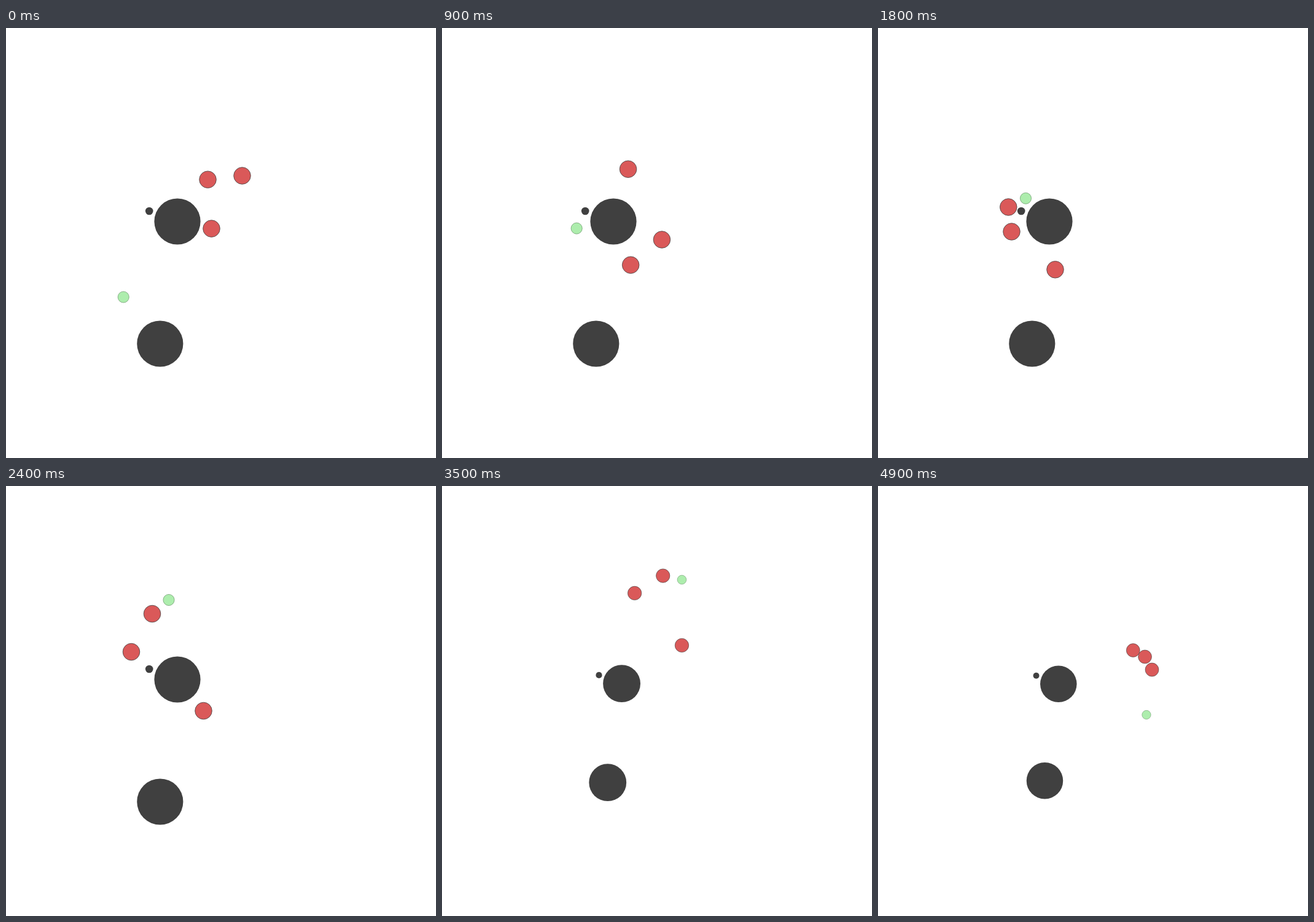
Recreate the animation shown at these times as an HTML page with a canvas. Size 700 by 700 pixels, loop 5000 ms.

```html
<!DOCTYPE html>
<html lang="en">
<head>
<meta charset="utf-8">
<title>Chase</title>
<style>
  html, body { margin: 0; width: 100%; height: 100%; overflow: hidden; background: #fff; }
  canvas { display: block; width: 100vmin; height: 100vmin; }
</style>
</head>
<body>
<canvas id="stage" width="700" height="700"></canvas>
<script>
const ctx = document.getElementById('stage').getContext('2d');
const LOOP = 5000, TICK = 100, MID = 350;
const ROCK = { x: 279, y: 315 };

// All movers circle the upper rock and share these key ticks
const beats = [0, 5, 13, 18, 24, 30, 35, 41, 49];
const runner = orbit([[191.2, 438], [208.2, 357.3], [224.5, 303.5], [240.5, 277.3],
  [265, 185.5], [314.8, 132.6], [400, 106], [457.8, 191.6], [459.9, 378.4]]);
const hunters = [
  [[328.5, 246.7], [345.2, 246.7], [245.3, 245], [212.3, 291.5],
   [238, 208], [297.2, 137.8], [362, 98], [437.8, 119], [456.8, 259]],
  [[384.5, 240.5], [384.5, 313.8], [330.8, 363.3], [288.5, 393.3],
   [321.5, 366], [370.2, 306.3], [400, 238], [430.9, 156.4], [471.3, 285.6]],
  [[334.5, 326.6], [336.8, 361.5], [259.5, 384.2], [217.5, 331.5],
   [204, 270], [242.2, 186.8], [305, 133], [407.7, 131.4], [432.5, 245.8]]
].map(orbit);

// Turns points into radius and unwrapped angle around the rock
function orbit(points) {
  let turn = 0;
  const angles = points.map(([x, y]) => {
    const a = Math.atan2(y - ROCK.y, x - ROCK.x);
    return turn = a + 2 * Math.PI * Math.round((turn - a) / (2 * Math.PI));
  });
  return { angles, radii: points.map(([x, y]) => Math.hypot(x - ROCK.x, y - ROCK.y)) };
}

// Smooth curve through one value per beat
function sample(values, t) {
  const last = beats.length - 1;
  const gap = j => beats[j + 1] - beats[j];
  const rate = j => (values[j + 1] - values[j]) / gap(j);
  const slope = j => j === 0 ? rate(0) : j === last ? rate(last - 1)
    : (rate(j - 1) * gap(j) + rate(j) * gap(j - 1)) / (gap(j - 1) + gap(j));
  let i = 0;
  while (i < last - 1 && t >= beats[i + 1]) i++;
  const h = gap(i), u = (t - beats[i]) / h, v = 1 - u;
  return values[i] * v * v * (1 + 2 * u) + values[i + 1] * u * u * (3 - 2 * u)
    + h * u * v * (slope(i) * v - slope(i + 1) * u);
}

// The camera pulls back with a quadratic ease-out
function zoom(t) {
  const p = Math.min(Math.max((t - 24) / 15.5, 0), 1);
  return 1 - 0.2085 * (1 - (1 - p) ** 2);
}

function disc(x, y, r, fill, line) {
  ctx.beginPath();
  ctx.arc(x, y, r, 0, Math.PI * 2);
  ctx.fillStyle = fill;
  ctx.fill();
  if (!line) return;
  ctx.strokeStyle = line;
  ctx.stroke();
}

function mover(path, t, r, fill, line) {
  const a = sample(path.angles, t), d = sample(path.radii, t);
  disc(ROCK.x + d * Math.cos(a), ROCK.y + d * Math.sin(a), r, fill, line);
}

function draw(t) {
  ctx.clearRect(0, 0, 700, 700);
  ctx.save();
  ctx.translate(MID, MID);
  ctx.scale(zoom(t), zoom(t));
  ctx.translate(-MID, -MID);
  hunters.forEach(path => mover(path, t, 13.8, '#da5959', 'rgba(64,64,64,.8)'));
  mover(runner, t, 9.1, 'rgba(50,210,50,.4)', 'rgba(64,110,64,.5)');
  disc(ROCK.x, ROCK.y, 37.6, '#404040');
  disc(250.8, 514, 37.6, '#404040');
  disc(233.2, 298, 6.3, '#404040');
  ctx.restore();
}

const start = performance.now();
function frame() {
  draw(Math.floor((performance.now() - start) % LOOP / TICK));
  requestAnimationFrame(frame);
}
frame();
</script>
</body>
</html>
```
